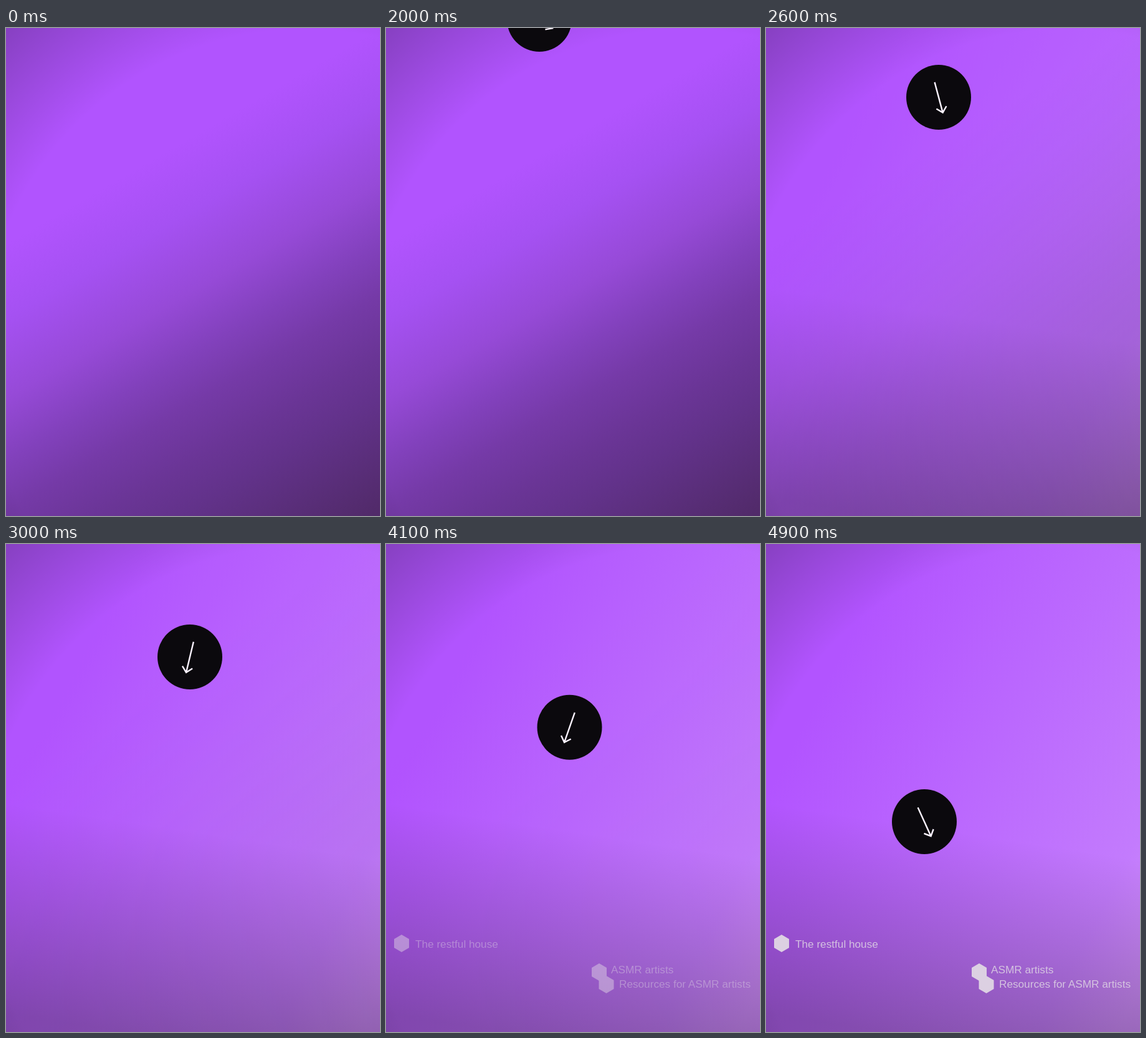
An HTML page for the animation above (5000 ms loop, 600 by 782 pixels).

```html
<!DOCTYPE html>
<html lang="en">
<head>
<meta charset="utf-8">
<title>Scroll arrow</title>
<style>
  html, body { margin: 0; width: 100%; height: 100%; overflow: hidden; background: #a050e8; }
  svg { display: block; width: 100%; height: 100%; }
  text { font: 17.2px "Liberation Sans", Arial, sans-serif; }
</style>
</head>
<body>
<svg viewBox="0 0 600 782" preserveAspectRatio="none">
  <defs>
    <linearGradient id="dusk" gradientUnits="userSpaceOnUse" x1="0" y1="0" x2="500" y2="866">
      <stop offset=".3" stop-color="rgb(177,84,254)"/>
      <stop offset=".404" stop-color="rgb(165,81,242)"/>
      <stop offset=".515" stop-color="rgb(150,74,215)"/>
      <stop offset=".6" stop-color="rgb(130,65,188)"/>
      <stop offset=".67" stop-color="rgb(117,58,167)"/>
      <stop offset=".75" stop-color="rgb(106,53,150)"/>
      <stop offset=".816" stop-color="rgb(98,50,138)"/>
      <stop offset=".972" stop-color="rgb(81,42,105)"/>
    </linearGradient>
    <linearGradient id="glow" gradientUnits="userSpaceOnUse" x1="80" y1="250" x2="680" y2="560">
      <stop offset="0" stop-color="rgb(178,84,255)"/>
      <stop offset=".83" stop-color="rgb(195,123,253)"/>
      <stop offset="1" stop-color="rgb(205,140,250)"/>
    </linearGradient>
    <linearGradient id="floor" gradientUnits="userSpaceOnUse" x1="300" y1="460" x2="250" y2="790">
      <stop offset="0" stop-color="rgb(60,38,72)" stop-opacity="0"/>
      <stop offset="1" stop-color="rgb(60,38,72)" stop-opacity=".43"/>
    </linearGradient>
    <radialGradient id="corner" gradientUnits="userSpaceOnUse" cx="480" cy="520" r="708">
      <stop offset=".73" stop-color="#000" stop-opacity="0"/>
      <stop offset="1" stop-color="#000" stop-opacity=".24"/>
    </radialGradient>
    <path id="hex" d="M0-14L12-7V7L0 14L-12 7V-7Z"/>
  </defs>

  <rect width="600" height="782" fill="url(#dusk)"/>
  <g id="light">
    <rect width="600" height="782" fill="url(#glow)"/>
    <rect width="600" height="782" fill="url(#floor)"/>
  </g>
  <rect width="600" height="782" fill="url(#corner)"/>

  <g id="labels" fill="#dcd0e2">
    <use href="#hex" x="25" y="640"/>
    <use href="#hex" x="342" y="686"/>
    <use href="#hex" x="353.5" y="706"/>
    <g fill-opacity=".88">
      <text x="47" y="647">The restful house</text>
      <text x="361" y="688">ASMR artists</text>
      <text x="374" y="711">Resources for ASMR artists</text>
    </g>
  </g>

  <g id="disc">
    <circle r="52" fill="#0b090d"/>
    <path id="arrow" d="M0-25V25M-8.3 17L0 25.5L8.3 17" fill="none" stroke="#fbf3ff" stroke-width="2.4"/>
  </g>
</svg>
<script>
const LOOP = 5000, STEP = 100;

// time, x, y, arrow angle, light
const KEYS = [
  [1200, 246, -66, -70, 0],
  [1700, 246, -14, -56, 0],
  [2000, 246, -14, -56, 0],
  [2600, 277, 111, -15, .64],
  [3000, 295, 181, 13.5, .89],
  [3400, 297.5, 194, 18.7, .92],
  [3800, 298, 196, 19.5, .93],
  [4000, 300, 250, 28, .95],
  [4200, 285, 337, 6, .98],
  [4500, 259, 415, -18.4, 1],
  [4800, 255, 440, -23.5, 1],
  [4900, 254, 445, -24.5, 1]
];

const $ = id => document.getElementById(id);
const clamp = v => Math.min(1, Math.max(0, v));

const slope = (i, c) => (KEYS[i + 1][c] - KEYS[i][c]) / (KEYS[i + 1][0] - KEYS[i][0]);

// Tangent that never overshoots its neighbours
function tangent(i, c) {
  if (i === 0) return slope(0, c);
  if (i === KEYS.length - 1) return slope(i - 1, c);
  const a = slope(i - 1, c), b = slope(i, c);
  return a * b > 0 ? 2 * a * b / (a + b) : 0;
}

function value(t, c) {
  const last = KEYS.length - 1;
  if (t <= KEYS[0][0]) return KEYS[0][c];
  if (t >= KEYS[last][0]) return KEYS[last][c];
  const i = KEYS.findIndex(k => k[0] > t) - 1;
  const a = KEYS[i], b = KEYS[i + 1], h = b[0] - a[0], u = (t - a[0]) / h;
  const w = u * u * (3 - 2 * u);
  return a[c] + (b[c] - a[c]) * w
    + h * u * (1 - u) * ((1 - u) * tangent(i, c) - u * tangent(i + 1, c));
}

function draw(t) {
  $("disc").setAttribute("transform", `translate(${value(t, 1)} ${value(t, 2)})`);
  $("arrow").setAttribute("transform", `rotate(${value(t, 3)})`);
  $("light").setAttribute("opacity", value(t, 4));
  $("labels").setAttribute("opacity", clamp((t - 3900) / 400));
}

const start = performance.now();
function tick() {
  const t = (performance.now() - start) % LOOP;
  draw(Math.floor(t / STEP) * STEP);
  requestAnimationFrame(tick);
}
tick();
</script>
</body>
</html>
```
